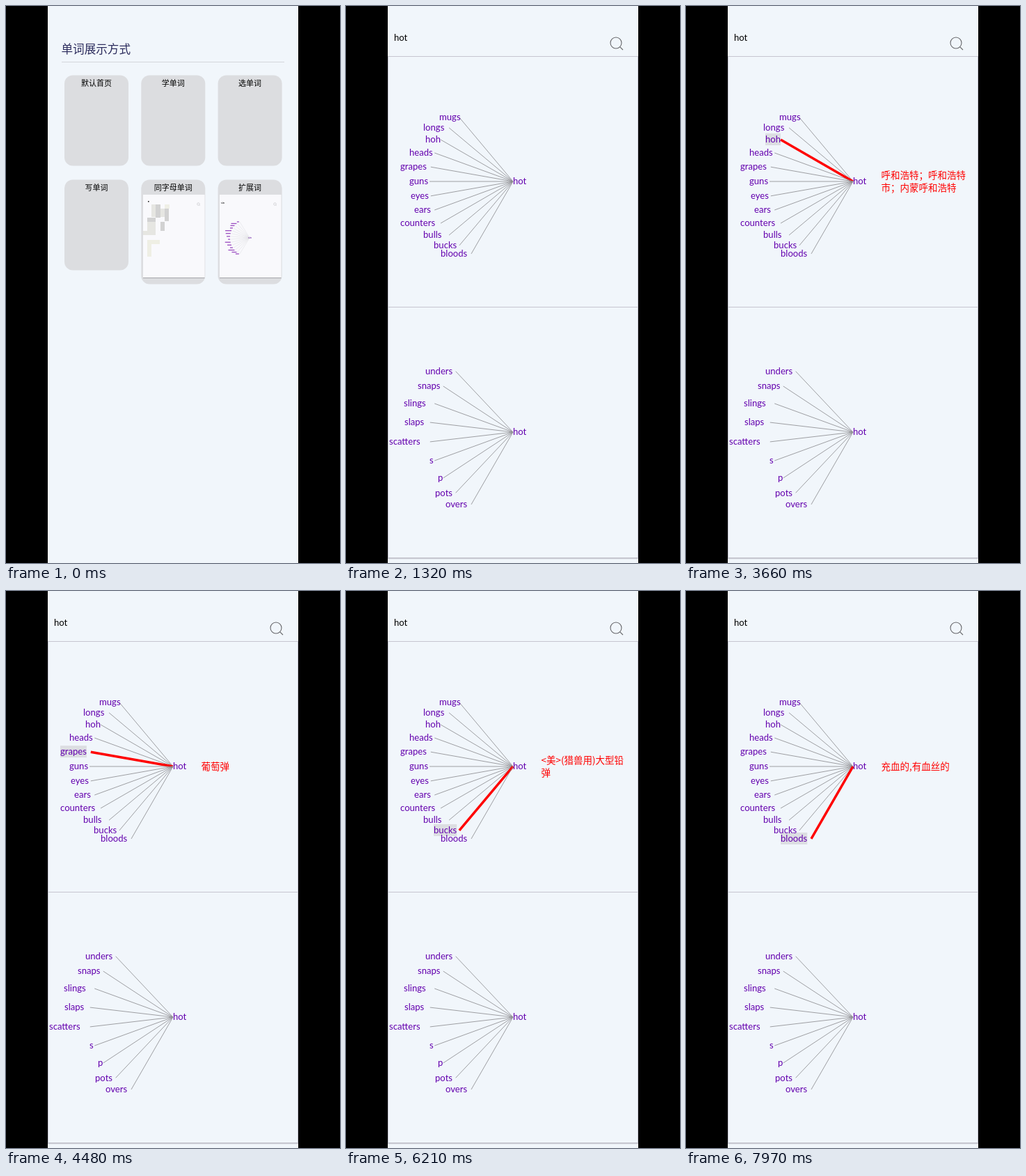
An HTML page that plays this animation: 480 by 800 pixels, repeating every 8 s.

```html
<!DOCTYPE html>
<html lang="zh">
<head>
<meta charset="utf-8">
<title>单词展示方式</title>
<style>
html, body { margin: 0; width: 100%; height: 100%; overflow: hidden; background: #000; }
svg { display: block; width: 480px; height: 800px; }
text { font: 13.1px Lato, "Noto Sans CJK SC", "Noto Sans CJK", sans-serif; }
.title { font-size: 16.6px; fill: #2b2b5c; }
.caption { font-size: 11px; text-anchor: middle; }
.tiny { font-size: 4px; }
.meaning { font: 13.5px "Noto Sans CJK SC", "Noto Sans CJK", sans-serif; fill: #f00; }
</style>
</head>
<body>
<svg viewBox="0 0 480 800">
  <clipPath id="screen"><rect x="60" width="360" height="800"/></clipPath>
  <rect width="480" height="800"/>
  <g id="phone" clip-path="url(#screen)"></g>
</svg>
<script>
const PAPER = '#f1f6fb', CARD = '#dcdde0', BORDER = '#c6c6d0', LINE = '#88888c', MARK = '#dcdee2';
const LOOP = 8000;

function add(parent, tag, attrs = {}, content) {
  const node = document.createElementNS('http://www.w3.org/2000/svg', tag);
  set(node, attrs);
  if (content) node.textContent = content;
  return parent.appendChild(node);
}

function set(node, attrs) {
  for (const key in attrs) node.setAttribute(key, attrs[key]);
}

function rect(parent, x, y, width, height, fill, more = {}) {
  return add(parent, 'rect', { x, y, width, height, fill, ...more });
}

function line(parent, x1, y1, x2, y2, stroke, width = 1) {
  return add(parent, 'line', { x1, y1, x2, y2, stroke, 'stroke-width': width });
}

const phone = document.getElementById('phone');
const menu = add(phone, 'g');
const page = add(phone, 'g');

function magnifier(parent, x, y, scale) {
  add(parent, 'path', {
    d: 'M-8 0a8 8 0 1 0 16 0a8 8 0 1 0-16 0M5.8 5.8L10 10',
    transform: `translate(${x} ${y}) scale(${scale})`,
    fill: 'none', stroke: '#66666a', 'stroke-width': 1.1
  });
}

function thumbnail(x) {
  rect(menu, x, 271, 88.5, 119, '#f9f9fc');
  line(menu, x, 390.5, x + 88.5, 390.5, '#a6a6aa');
  magnifier(menu, x + 79.5, 284.5, 0.22);
}

function mosaic() {
  thumbnail(197);
  rect(menu, 204, 280, 1.6, 1.6, '#222');
  const cells = [[209, 285, 6, 18], [215, 285, 7, 6], [215, 291, 7, 13], [222, 291, 6, 12],
    [228, 291, 6, 18], [203, 304, 6, 6], [203, 310, 12, 13], [209, 304, 6, 6],
    [222, 310, 6, 13], [197, 323, 18, 6], [203, 336, 18, 6], [203, 342, 6, 18]];
  cells.forEach(([x, y, w, h], i) =>
    rect(menu, x, y, w, h, i > 9 ? '#efefe4' : i % 3 ? '#d2d2d2' : '#e6e6e2'));
  rect(menu, 228, 285, 7, 6, '#efefe6');
}

function miniFan() {
  thumbnail(307);
  add(menu, 'text', { x: 309, y: 284, class: 'tiny' }, 'sin');
  for (let i = 0; i < 14; i++) {
    const angle = (i - 6.5) * 9 * Math.PI / 180;
    const x = 350 - 27 * Math.cos(angle), y = 333 + 27 * Math.sin(angle);
    line(menu, x, y, 350, 333, '#dcdce0', 0.5);
    line(menu, x - 4 - i * 5 % 7, y, x - 1, y, '#9a4cc0', 1.3);
  }
  add(menu, 'text', { x: 348, y: 334, class: 'tiny', fill: '#6a20a0' }, 'sin');
}

function buildMenu() {
  rect(menu, 60, 0, 360, 800, PAPER);
  add(menu, 'text', { x: 79.5, y: 68, class: 'title' }, '单词展示方式');
  line(menu, 80, 80.5, 400, 80.5, '#d4d6dc');
  ['默认首页', '学单词', '选单词', '写单词', '同字母单词', '扩展词'].forEach((name, i) => {
    const x = 84 + i % 3 * 110.3, y = i < 3 ? 99.5 : 249.5;
    rect(menu, x, y, 92, i < 4 ? 130 : 150, CARD, { rx: 12 });
    add(menu, 'text', { x: x + 46, y: y + 15.5, class: 'caption' }, name);
  });
  mosaic();
  miniFan();
}

// Each word: label, left edge, meaning ("|" breaks the line), time it lights up
const upper = [
  ['mugs', 134, '面部照片', 1640],
  ['longs', 111, '远景;大胆的尝试', 2300],
  ['hoh', 114, '呼和浩特；呼和浩特|市；内蒙呼和浩特', 3000],
  ['heads', 91, '头部特写,爆头射击', 3880],
  ['grapes', 78, '葡萄弹', 4270],
  ['guns', 91, '射击;枪炮声;射程', 4640],
  ['eyes', 93, '视野;视界', 4930],
  ['ears', 98, '听力所及之范围', 5190],
  ['counters', 78, '反拍镜头', 5450],
  ['bulls', 111, '牛肉汁鸡尾酒', 5730],
  ['bucks', 126, '<美>(猎兽用)大型铅|弹', 6130],
  ['bloods', 136, '充血的,有血丝的', 7150]
];
const lower = [['unders', 114], ['snaps', 103], ['slings', 83], ['slaps', 84],
  ['scatters', 62], ['s', 120], ['p', 132], ['pots', 128], ['overs', 143]];

const CX = 240, RADIUS = 120;
const words = [];

function buildFan(list, cy) {
  rect(page, 60.5, cy - 179.5, 359, 360, 'none', { stroke: BORDER });
  list.forEach(([label, left, meaning, start], i) => {
    const angle = (60 - (list.length - 1 - i) * 120 / list.length) * Math.PI / 180;
    const x = CX - RADIUS * Math.cos(angle), y = cy + RADIUS * Math.sin(angle);
    const word = { left, x, y, cy, start, meaning };
    word.mark = rect(page, left, y - 9, 10, 17, MARK);
    word.spoke = line(page, x, y, CX, cy, LINE, 0.8);
    words.push(word);
  });
  // Labels sit above every highlight
  list.forEach(([label], i) => {
    words[words.length - list.length + i].text = add(page, 'text', {}, label);
  });
  words.push({ text: add(page, 'text', { x: CX, y: cy + 4.3 }, 'hot') });
}

function buildPage() {
  rect(page, 60, 0, 360, 800, PAPER);
  add(page, 'text', { x: 69, y: 50 }, 'hot');
  magnifier(page, 388, 53, 1);
  buildFan(upper, 252);
  buildFan(lower, 612);
  line(page, 60, 793.5, 420, 793.5, BORDER, 1.5);
}

buildMenu();
buildPage();
const meaningLines = [0, 1].map(() => add(page, 'text', { x: 280.5, class: 'meaning' }));

const easeOut = (t, from, span) =>
  1 - (1 - Math.min(1, Math.max(0, (t - from) / span))) ** 3;

function draw(t) {
  const slide = easeOut(t, 40, 300);
  page.setAttribute('transform', `translate(${360 * (1 - slide)} 0)`);
  const grow = easeOut(t, 150, 400);
  const ink = t < 840 ? '#7814cc' : '#6300ae';
  const active = words.filter(w => w.start <= t).pop();

  for (const w of words) {
    w.text.setAttribute('fill', ink);
    if (!w.spoke) continue;
    const lit = w === active;
    const dx = (CX - w.x) * (1 - grow), dy = (w.cy - w.y) * (1 - grow);
    set(w.text, { x: w.left + dx, y: w.y + dy + 4.3 });
    set(w.spoke, {
      x1: w.x + dx, y1: w.y + dy,
      stroke: lit ? '#f00' : LINE, 'stroke-width': lit ? 3.5 : 0.8
    });
    set(w.mark, { width: w.text.getComputedTextLength(), opacity: lit ? 1 : 0 });
  }

  const parts = active ? active.meaning.split('|') : [];
  meaningLines.forEach((node, i) => {
    node.textContent = parts[i] || '';
    node.setAttribute('y', 257 + (i - (parts.length - 1) / 2) * 18.5);
  });
}

const begin = performance.now();
function tick() {
  draw((performance.now() - begin) % LOOP);
  requestAnimationFrame(tick);
}
tick();
</script>
</body>
</html>
```
